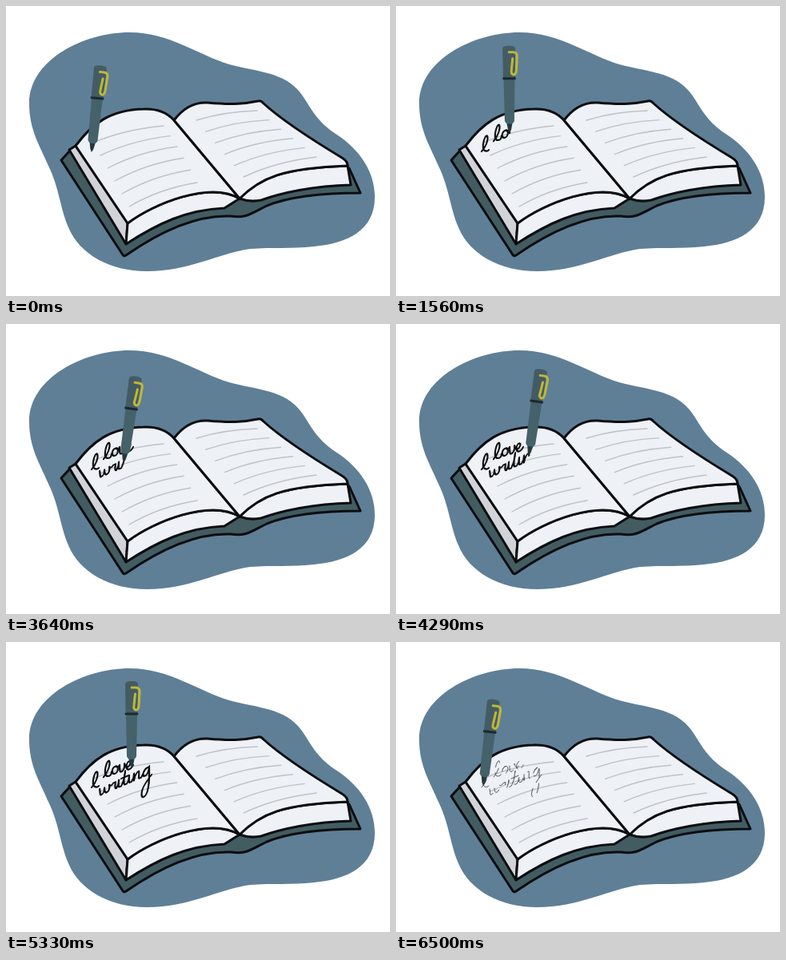
Animation, 480 px wide and 363 px high, one loop 6.63 s. Source, as an HTML page with a canvas:

```html
<!DOCTYPE html>
<html lang="en">
<head>
<meta charset="utf-8">
<title>Pen writing in a notebook</title>
<style>
  html, body { margin: 0; width: 100%; height: 100%; overflow: hidden; background: #fff; }
  canvas { display: block; width: 480px; height: 363px; }
</style>
</head>
<body>
<canvas id="stage" width="480" height="363"></canvas>
<script>
const ctx = document.getElementById('stage').getContext('2d');
const STEP = 130, STEPS = 51;
const INK = '#0b0d10', PAPER = '#eef1f5';

const clamp = v => Math.max(0, Math.min(1, v));
const mix = (a, b, t) => a + (b - a) * t;

// Script letters as relative pen movements, joined end to end.
const glyphs = {
  l: 'c5 -4 9 -13 7 -18c-3 -3 -8 14 -3 18c2 1 4 1 5 0',
  o: 'c1 -4 3 -9 6 -9c-5 0 -6 9 -1 9c5 0 5 -9 1 -9c2 2 4 2 5 0',
  v: 'c0 4 0 9 2 9c3 0 5 -5 4 -9c1 4 2 5 3 6',
  e: 'c4 -1 6 -6 3 -7c-4 0 -5 10 0 10c2 0 4 -2 5 -4',
  w: 'm0 -8c1 4 0 8 2 8c3 0 4 -4 4 -7c0 4 1 7 3 7c3 0 4 -5 3 -8c1 2 3 2 4 1',
  r: 'c1 -2 3 -1 4 -1c-1 4 -1 8 1 8',
  i: 'c2 -2 3 -6 3 -9c0 4 -1 9 1 9h2',
  t: 'c3 -4 5 -12 5 -17c-1 6 -3 17 0 17h2',
  n: 'c2 -2 3 -6 3 -9v9c1 -6 4 -10 6 -9c1 2 -1 9 1 9h2',
  g: 'c2 -3 4 -9 8 -9c-5 -1 -8 9 -3 9c3 0 5 -6 5 -10c0 10 1 30 -5 35c-6 3 -6 -8 0 -15c3 -3 5 -6 8 -8',
  '-': 'h9',
  '.': 'h.6',
  ' ': 'h.1'
};

// A blank text is a place where the pen hovers.
function word(text, x, y, slope, from, to, tilt) {
  const d = 'M0 0' + [...text].map(c => glyphs[c]).join('');
  const curve = document.createElementNS('http://www.w3.org/2000/svg', 'path');
  curve.setAttribute('d', d);
  const length = curve.getTotalLength();
  const progress = step => clamp((step - from) / (to - from)) ** 1.3;
  const pointAt = step => {
    const p = curve.getPointAtLength(length * progress(step));
    return { x: x + p.x, y: y + p.y - slope * p.x };
  };
  return { text, x, y, slope, from, to, tilt, length, progress, pointAt, path: new Path2D(d) };
}

const words = [
  word('l', 107, 182, .2, 0, 5, 6),
  word('love', 122, 169, .3, 6, 14.5, -.5),
  word(' ', 113, 188, 0, 19.5, 20, 3),
  word('writing', 117, 192, .43, 21, 39, 8),
  word('-', 144, 171, .43, 39.5, 40.3, 3),
  word('.', 157, 157, 0, 41, 41.4, -3),
  word(' ', 109, 179, 0, 47, 51, 7)
];

function fill(d, color) {
  ctx.fillStyle = color;
  ctx.fill(new Path2D(d));
}

function line(d, color = INK, width = 3) {
  ctx.strokeStyle = color;
  ctx.lineWidth = width;
  ctx.stroke(new Path2D(d));
}

function shape(d, color) {
  fill(d, color);
  line(d);
}

function drawBlob() {
  fill('M154 33C205 33 241 62 279 73C315 83 348 82 369 110C382 128 386 142 412 160' +
    'C443 180 461 208 461 239C461 281 427 297 385 301C355 304 333 302 305 304' +
    'C264 310 229 332 176 332C130 332 92 311 78 277C67 251 67 229 53 200' +
    'C42 174 29 155 29 122C29 67 98 33 154 33Z', '#5f7f97');
}

function drawRules(x1, y1, dx1, dy1, x2, y2, dx2, dy2, growth) {
  for (let i = 0; i < 6; i++) {
    const sx = x1 + dx1 * i, sy = y1 + dy1 * i;
    const ex = x2 + dx2 * i, ey = y2 + dy2 * i + growth * i * i;
    line(`M${sx} ${sy}Q${mix(sx, ex, .45)} ${mix(sy, ey, .65) - 3} ${ex} ${ey}`, '#bfc2c7', 1.4);
  }
}

function drawBook() {
  shape('M69 193L80 181L290 236L429 203L443 234C392 234 353 239 326 250' +
    'C306 260 300 266 281 263C235 261 190 284 150 312Q147 314 145 310Z', '#425c62');
  shape('M87 175L79 180L150 298L152 272Z', '#d2d3d8');

  const leftCurve = 'C185 247 255 219 292 241';
  shape(`M152 272${leftCurve}L273 253C226 255 190 272 150 298Z`, PAPER);
  const rightCurve = 'C318 215 345 203 427 200';
  shape(`M292 241${rightCurve}L431 224C384 225 344 234 319 243Q305 246 292 241Z`, PAPER);

  shape(`M152 272L87 175C108 147 130 130 172 129C190 128 202 134 210 143L292 241C255 219 185 247 152 272Z`, PAPER);
  shape(`M292 241L210 143C222 127 235 120 252 121C285 124 300 122 315 119Q319 118 322 122` +
    'C346 144 382 167 420 190Q427 194 427 200C345 203 318 215 292 241Z', PAPER);

  drawRules(109, 171, 9, 16, 197, 150, 8.4, 12.2, .4);
  drawRules(238, 143, 11.8, 14.2, 314, 131, 14.8, 11.6, 0);
}

function drawWriting(step) {
  const fade = clamp((step - 44) / 6);
  ctx.strokeStyle = fade > .5 ? '#3b3e43' : INK;
  ctx.lineWidth = mix(2.2, .8, fade);
  for (const w of words) {
    const done = w.progress(step);
    if (w.text === ' ' || done === 0) continue;
    ctx.save();
    ctx.transform(1, -w.slope, 0, 1, w.x, w.y);
    ctx.setLineDash(fade > .3 ? [11, 7 * fade] : [w.length * done, 999]);
    ctx.stroke(w.path);
    ctx.restore();
  }
}

function penPose(step) {
  const index = words.findIndex(w => step <= w.to);
  const current = words[index], previous = words[index - 1] || current;
  const tilt = mix(previous.tilt, current.tilt, clamp((step - current.from + 2) / 4));
  const b = current.pointAt(step);
  if (step >= current.from) return { ...b, tilt };
  const a = previous.pointAt(step);
  const t = (step - previous.to) / (current.from - previous.to);
  return { x: mix(a.x, b.x, t), y: mix(a.y, b.y, t), tilt };
}

function drawPen(step) {
  const { x, y, tilt } = penPose(step);
  ctx.save();
  ctx.translate(x, y);
  ctx.rotate(tilt * Math.PI / 180);
  fill('M-4 -13H4L2 -3L0 1L-2 -3Z', '#26383f');
  fill('M-7 -68H7L6 -14Q5 -10 0 -10Q-5 -10 -6 -14Z', '#45616a');
  fill('M-8 -105Q-7 -108 0 -108Q7 -108 8 -105L7.5 -68H-7.5Z', '#435c64');
  line('M-7 -67H7', '#1b2a30', 3);
  line('M0 -100H5Q10 -100 10 -95L9 -77Q8 -71 5 -72Q2 -73 3 -78L4.5 -92', '#c0b835', 3);
  ctx.restore();
}

function render(now) {
  const step = Math.floor(now / STEP) % STEPS;
  ctx.fillStyle = '#fff';
  ctx.fillRect(0, 0, 480, 363);
  ctx.lineCap = ctx.lineJoin = 'round';
  drawBlob();
  drawBook();
  drawWriting(step);
  drawPen(step);
  requestAnimationFrame(render);
}

requestAnimationFrame(render);
</script>
</body>
</html>
```
